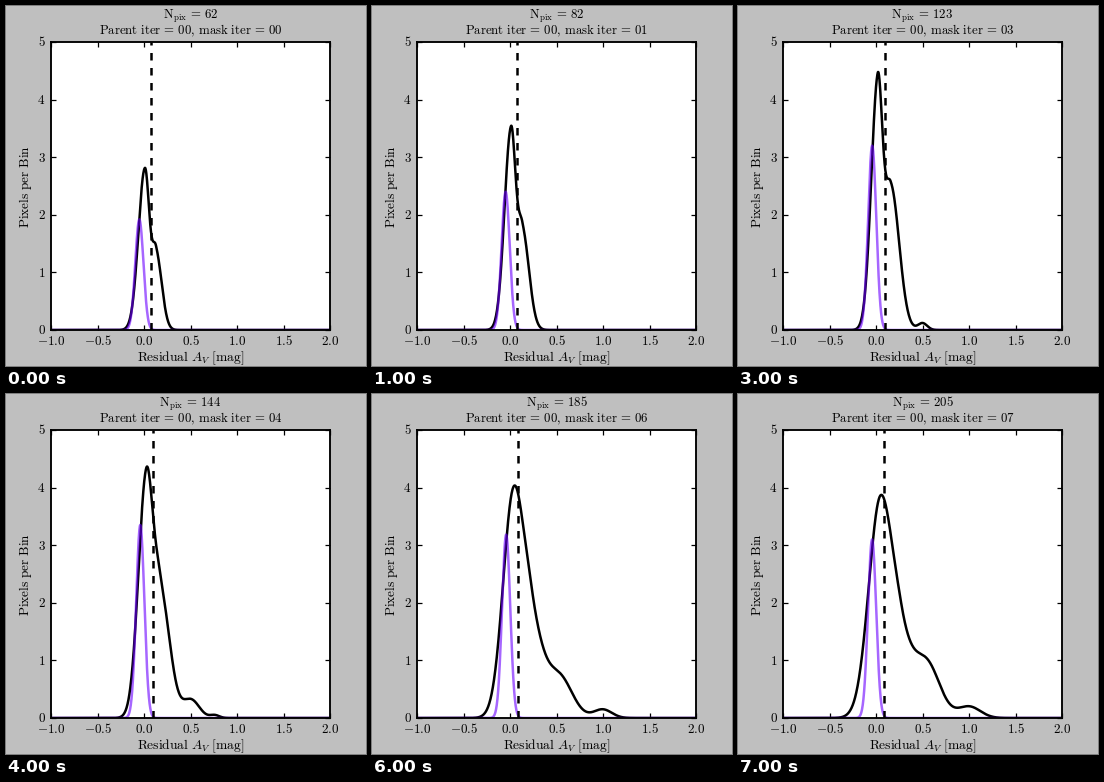
Animation of 360x360 px, one loop 8 s. Source, as a matplotlib script:

```python
import numpy as np
import matplotlib.pyplot as plt
from matplotlib.animation import FuncAnimation

plt.rcParams.update({
    "mathtext.fontset": "cm",
    "mathtext.default": "rm",
    "lines.scale_dashes": False,
    "axes.linewidth": 1.5,
    "toolbar": "None",
})

SIZE, DPI = 360, 90
STEPS = 8
PURPLE = (0.42, 0.0, 1.0)


def eased(i, *values):
    """Value at iteration i between a few key iterations."""
    return np.interp(i, [0, 2, 3, 4, 7], values)


def hump(x, mid, height, left, right):
    width = np.where(x < mid, left, right)
    return height * np.exp(-0.5 * ((x - mid) / width) ** 2)


def all_pixels(x, i):
    """Core, shoulder and two outer bumps that spread as the mask grows."""
    grow = max(i - 3, 0)
    core = hump(x, 0.01 + 0.0008 * i**2, eased(i, 2.8, 4.14, 4.2, 4.1, 3.8),
                0.07 + 0.014 * grow, 0.05 + 0.021 * grow)
    shoulder = hump(x, 0.13 + 0.003 * i**2, 2.5 - 0.4 * abs(i - 3),
                    0.04 + 0.0085 * i, 0.062 + 0.01 * i)
    spread = min(0.05 + 0.04 * grow, 0.14)
    bump = hump(x, 0.5 + 0.003 * grow**2, 0.2 * max(i - 2.4, 0), spread, spread)
    spread = 0.025 + 0.024 * grow
    tail = hump(x, 1 - 1.92 * 8.0**-grow, 0.05 * grow, spread, spread)
    return core + shoulder + bump + tail


def masked_pixels(x, i):
    return hump(x, eased(i, -0.05, -0.044, -0.041, -0.04, -0.042),
                eased(i, 1.92, 2.88, 3.2, 3.35, 3.1), 0.044, 0.044)


fig = plt.figure(figsize=(SIZE / DPI, SIZE / DPI), dpi=DPI, facecolor="0.75")
ax = fig.add_axes([0.125, 0.1, 0.775, 0.8])
ax.set(xlim=(-1, 2), ylim=(0, 5))
ax.set_xticks(np.arange(-1, 2.1, 0.5))
ax.set_yticks(range(6))
ax.tick_params(direction="in", length=4, width=1, top=True, right=True,
               labelbottom=False, labelleft=False)


def label(x, y, text, px, ha="center", **kw):
    """Put text with its baseline at a pixel position from the top left."""
    return fig.text(x / SIZE, 1 - y / SIZE, text, fontsize=px * 72 / DPI,
                    ha=ha, va="baseline", **kw)


for v in np.arange(-1, 2.1, 0.5):
    label(45 + 93 * (v + 1), 339.3, f"${v:.1f}$", 13)
for v in range(6):
    label(39.5, 328.3 - 57.6 * v, f"${v}$", 13, ha="right")
label(184.5, 355, r"$Residual\ \mathit{A}_{\mathit{V}}\ [mag]$", 13.5)
label(23.5, 180.5, r"$Pixels\ per\ Bin$", 13.3, rotation=90, rotation_mode="anchor")
count = label(184.5, 13, "", 12.8)
stage = label(184.5, 28, "", 12.8)

x = np.linspace(-1, 2, 1201)
total, = ax.plot(x, 0 * x, color="k", lw=2)
masked, = ax.plot(x, 0 * x, color=PURPLE, lw=2, alpha=0.6)
mean_line = ax.axvline(0, color="k", lw=2, dashes=(6, 6), dash_capstyle="butt")


def update(i):
    total.set_ydata(all_pixels(x, i))
    masked.set_ydata(masked_pixels(x, i))
    mean_line.set_xdata([eased(i, 0.075, 0.085, 0.094, 0.096, 0.085)] * 2)
    count.set_text(rf"$N_{{pix}}\,=\,{int(62 + 20.5 * i)}$")
    stage.set_text(rf"$Parent\ iter\,=\,00,\,mask\ iter\,=\,{i:02d}$")
    return total, masked, mean_line, count, stage


anim = FuncAnimation(fig, update, frames=STEPS, init_func=lambda: update(0),
                     interval=1000, repeat=True, repeat_delay=0)
plt.show()
```
